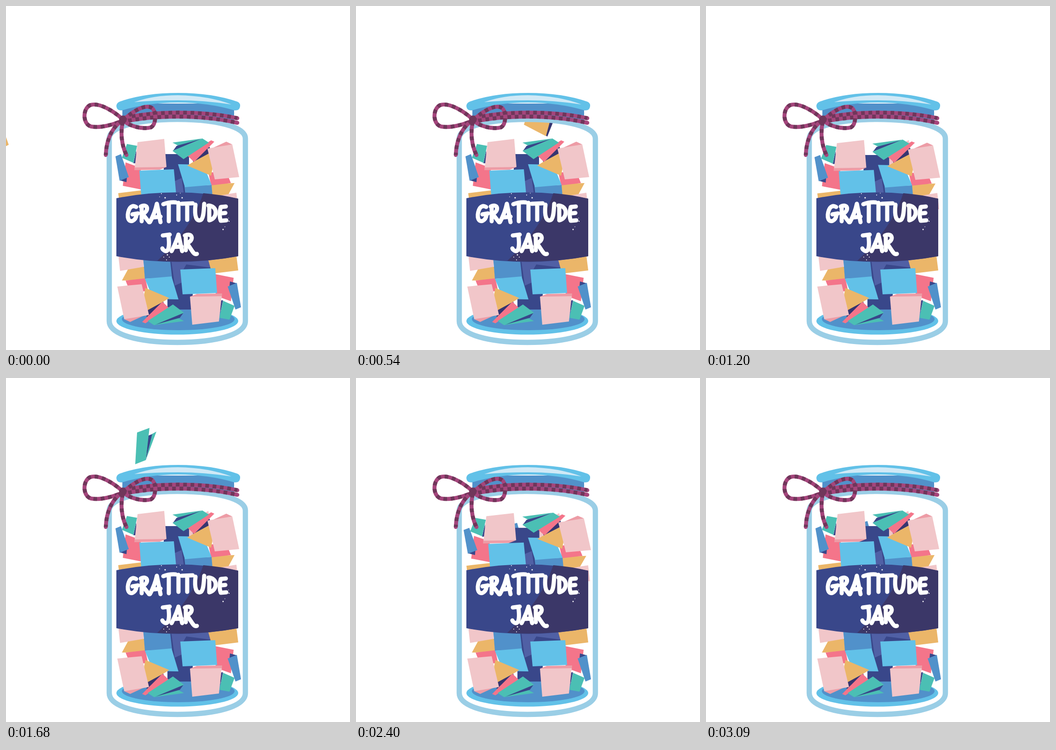
Write an HTML page that moves like this. It is 748 px wide and 748 px high and loops after 3.12 s.

```html
<!DOCTYPE html>
<html lang="en">
<head>
<meta charset="utf-8">
<title>Gratitude jar</title>
<style>
  html, body { margin: 0; height: 100%; overflow: hidden; background: #fff; }
  svg { display: block; width: 100vw; height: 100vh; }
  .navy { fill: #39478a; }
  .ink { fill: #363570; }
  .violet { fill: #5060a5; }
  .blue { fill: #5191ca; }
  .sky { fill: #62c1e8; }
  .teal { fill: #4bbfb4; }
  .red { fill: #f4758a; }
  .rose { fill: #ed9ca6; }
  .pale { fill: #f1c6c9; }
  .gold { fill: #ebb669; }
  .rope use { fill: none; stroke: #a5457c; stroke-width: 8.5; stroke-linecap: round; }
  .rope .dash { stroke: #70365a; stroke-linecap: butt; stroke-dasharray: 8 8; }
  .brush { fill: none; stroke: #fff; stroke-width: 9; stroke-linecap: round; stroke-linejoin: round; }
  .dots { fill: #fff; }
</style>
</head>
<body>
<svg viewBox="0 0 748 748">
  <defs>
    <g id="pile">
      <polygon class="navy" points="351,536 406,536 406,660 351,660"/>
      <polygon class="violet" points="357,536 442,536 446,571 385,574 385,600 367,608"/>
      <polygon class="navy" points="392,562 455,570 455,574 385,574"/>
      <polygon class="gold" points="440,553 501,543 505,575 448,582"/>
      <polygon class="red" points="455,583 495,591 489,642 456,630"/>
      <polygon class="navy" points="487,599 502,603 486,610"/>
      <polygon class="blue" points="482,610 502,602 511,655 499,660"/>
      <polygon class="navy" points="464,640 472,640 466,668"/>
      <polygon class="teal" points="472,641 497,652 486,682 464,678"/>
      <polygon class="rose" points="400,632 415,626 470,625 469,634"/>
      <polygon class="pale" points="400,632 469,631 463,686 405,693"/>
      <polygon class="sky" points="379,573 455,570 459,624 384,627"/>
      <polygon class="pale" points="244,540 299,545 299,568 248,576"/>
      <polygon class="gold" points="265,573 300,567 303,595 252,597"/>
      <polygon class="red" points="260,597 303,592 309,620 270,622"/>
      <polygon class="blue" points="298,545 356,545 361,590 302,593"/>
      <polygon class="sky" points="302,593 360,588 375,638 320,637"/>
      <polygon class="gold" points="303,613 355,635 309,663 296,650"/>
      <polygon class="ink" points="305,663 342,643 345,652 306,676"/>
      <polygon class="rose" points="257,681 311,668 270,687"/>
      <polygon class="red" points="296,687 340,643 355,657 303,690"/>
      <polygon class="teal" points="322,694 370,676 387,685"/>
      <polygon class="navy" points="324,693 386,667 378,678"/>
      <polygon class="teal" points="308,685 363,649 387,667 322,694"/>
      <polygon class="pale" points="242,610 295,605 311,672 257,681"/>
    </g>
    <g id="cord">
      <path id="neckTop" d="M258 243C330 228 430 228 503 244"/>
      <path id="neckLow" d="M258 251C330 236 430 237 503 254"/>
      <path id="loopL" d="M255 248C235 228 200 208 182 216C165 226 168 258 185 262C205 266 235 258 255 248"/>
      <path id="loopR" d="M255 248C280 225 305 213 318 222C328 232 326 258 315 264C295 269 265 260 255 248"/>
      <path id="tailL" d="M252 250C232 262 218 290 217 324"/>
      <path id="tailR" d="M254 252C248 275 252 305 262 324"/>
    </g>
  </defs>

  <g id="notes">
    <g>
      <polygon class="ink" points="428,228 428,254 416,284 408,278"/>
      <polygon class="gold" points="381,214 428,228 413,283 365,258"/>
    </g>
    <g>
      <polygon class="rose" points="484,113 478,154 490,165"/>
      <polygon class="pale" points="484,113 530,118 526,165 483,168"/>
    </g>
    <g>
      <polygon class="navy" points="309,125 319,121 304,178"/>
      <polygon class="teal" points="327,116 304,178 318,121"/>
      <polygon class="teal" points="285,118 312,108 304,178 281,187"/>
    </g>
    <g>
      <polygon class="navy" points="630,65 645,73 623,99"/>
      <polygon class="blue" points="589,37 631,61 623,99 576,73"/>
    </g>
    <g>
      <polygon class="ink" points="217,96 214,146 203,142"/>
      <polygon class="red" points="167,83 217,95 202,150 155,129"/>
    </g>
  </g>

  <ellipse class="sky" cx="372.500" cy="685" rx="132.500" ry="29.500"/>
  <ellipse class="blue" cx="374.500" cy="681" rx="122.500" ry="24"/>
  <use href="#pile"/>
  <g id="top">
    <polygon id="restPink" class="pale" points="398,312 440,289 446,330 398,348"/>
    <g id="restBlue">
      <polygon class="navy" points="325,338 350,325 346,362 335,359"/>
      <polygon class="blue" points="328,318 351,311 354,322 330,340"/>
    </g>
    <use href="#pile" transform="rotate(180 374.500 491)"/>
  </g>

  <path class="navy" d="M240 418Q372 392 505 419V544Q372 569 240 544Z"/>
  <path d="M429 407Q467 410 505 419V544Q418 560 329 554Q405 482 429 407Z" fill="#3b3768"/>
  <g class="brush" role="img" aria-label="GRATITUDE JAR">
    <path d="M283 437C268 428 262 454 266 463C270 472 282 468 284 453M275 453L287 451"/>
    <path d="M295 435V468M293 436C310 428 311 447 297 452L311 470"/>
    <path d="M313 470C321 455 326 440 328 430L336 470M318 460L336 458"/>
    <path d="M342 431Q355 426 369 427M354 430V468M375 428V465"/>
    <path d="M382 430L406 429M394 430V465"/>
    <path d="M412 432C409 460 415 468 422 466C429 464 430 450 431 430"/>
    <path d="M442 434V466C461 462 461 434 440 434"/>
    <path d="M478 436L467 437C464 446 464 460 467 467L479 466M467 451L477 450"/>
    <path d="M341 499L356 497M353 498C356 520 354 534 347 533Q341 531 340 527"/>
    <path d="M360 533C367 520 372 507 375 497L383 533M365 524L382 523"/>
    <path d="M391 499V531M389 499C407 491 409 512 393 515L405 533Q410 541 415 539"/>
  </g>
  <g class="dots" id="dots"></g>

  <path d="M224.500 288C224.500 262 290 246.500 372.500 246.500S520.500 262 520.500 288V685C520.500 715 455 731.500 372.500 731.500S224.500 715 224.500 685Z"
        fill="none" stroke="#9acee6" stroke-width="11.500"/>
  <path class="blue" d="M253 212H496V257Q440 240 374 240T253 257Z"/>
  <path class="sky" d="M247 208Q300 189 374 189T503 208Q510 211 509 218Q508 228 497 227Q440 210 374 210T252 227Q241 228 240 218Q240 211 247 208Z"/>
  <path d="M279 209Q320 194 374 194Q440 195 490 214Q430 205 374 205Q320 205 279 209Z" fill="#d0e9f6"/>
  <g class="rope" id="rope"></g>
  <ellipse cx="254" cy="247" rx="8" ry="9" fill="#70365a"/>
</svg>
<script>
const LOOP = 3120, STEP = 30, BOUNCE = 230;
const $ = id => document.getElementById(id);

$('rope').innerHTML = [...$('cord').children]
  .map(({ id }) => `<use href="#${id}"/><use class="dash" href="#${id}"/>`).join('');
// Offset one strand so the two wraps form a checker pattern
$('rope').children[3].style.strokeDashoffset = 8;

$('dots').innerHTML = ['346 417 1.6', '338 408 1', '334 415 .8', '371 411 1', '379 407 .8', '383 417 1.5',
  '472 486 1.4', '476 480 .8', '485 468 1.2', '484 461 .8', '351 541 1.5', '343 546 .9', '355 546 1', '349 552 1']
  .map(s => s.split(' ')).map(([x, y, r]) => `<circle cx="${x}" cy="${y}" r="${r}"/>`).join('');

// Visible from start to land; (x, y) is the drawn pose, held at time `at`.
// Height follows two half-parabolas: from -> peak -> to.
const flights = [
  { start: 0, land: 600, at: 540, x: 396, y: 248, speed: .777, spin: .254, from: 288, peak: 100, peakAt: 286, to: 326 },
  { start: 830, land: 1160, at: 1080, x: 506, y: 140, speed: -1.15, spin: -.25, from: 260, peak: 90, peakAt: 1010, to: 318 },
  { start: 1380, land: 1740, at: 1680, x: 305, y: 148, speed: 1.15, spin: .25, from: 290, peak: 52, peakAt: 1590, to: 320 },
  { start: 1915, land: 2290, at: 2070, x: 609, y: 68, speed: -1.1, spin: -.25, from: 290, peak: 62, peakAt: 2100, to: 320 },
  { start: 2500, land: 2860, at: 2700, x: 186, y: 117, speed: 1.125, spin: .25, from: 290, peak: 114.5, peakAt: 2680, to: 320 }
];
const notes = [...$('notes').children];
const show = (el, on) => el.setAttribute('visibility', on ? 'visible' : 'hidden');

function height(f, t) {
  const [end, y] = t < f.peakAt ? [f.start, f.from] : [f.land, f.to];
  return f.peak + (y - f.peak) * ((t - f.peakAt) / (end - f.peakAt)) ** 2;
}

function draw(t) {
  let squash = 0;
  flights.forEach((f, i) => {
    const dt = t - f.at, since = t - f.land;
    show(notes[i], t >= f.start && since < 0);
    notes[i].setAttribute('transform',
      `translate(${f.speed * dt} ${height(f, t) - f.y}) rotate(${f.spin * dt} ${f.x} ${f.y})`);
    if (since >= 0 && since < BOUNCE) squash = .03 * Math.sin(Math.PI * since / BOUNCE);
  });
  show($('restPink'), t >= flights[1].land);
  show($('restBlue'), t >= flights[3].land);
  $('top').setAttribute('transform',
    `translate(374 446) scale(${1 + squash} ${1 - squash}) translate(-374 -446)`);
}

const origin = performance.now();
function tick() {
  const t = (performance.now() - origin) % LOOP;
  draw(Math.floor(t / STEP) * STEP);
  requestAnimationFrame(tick);
}
tick();
</script>
</body>
</html>
```
